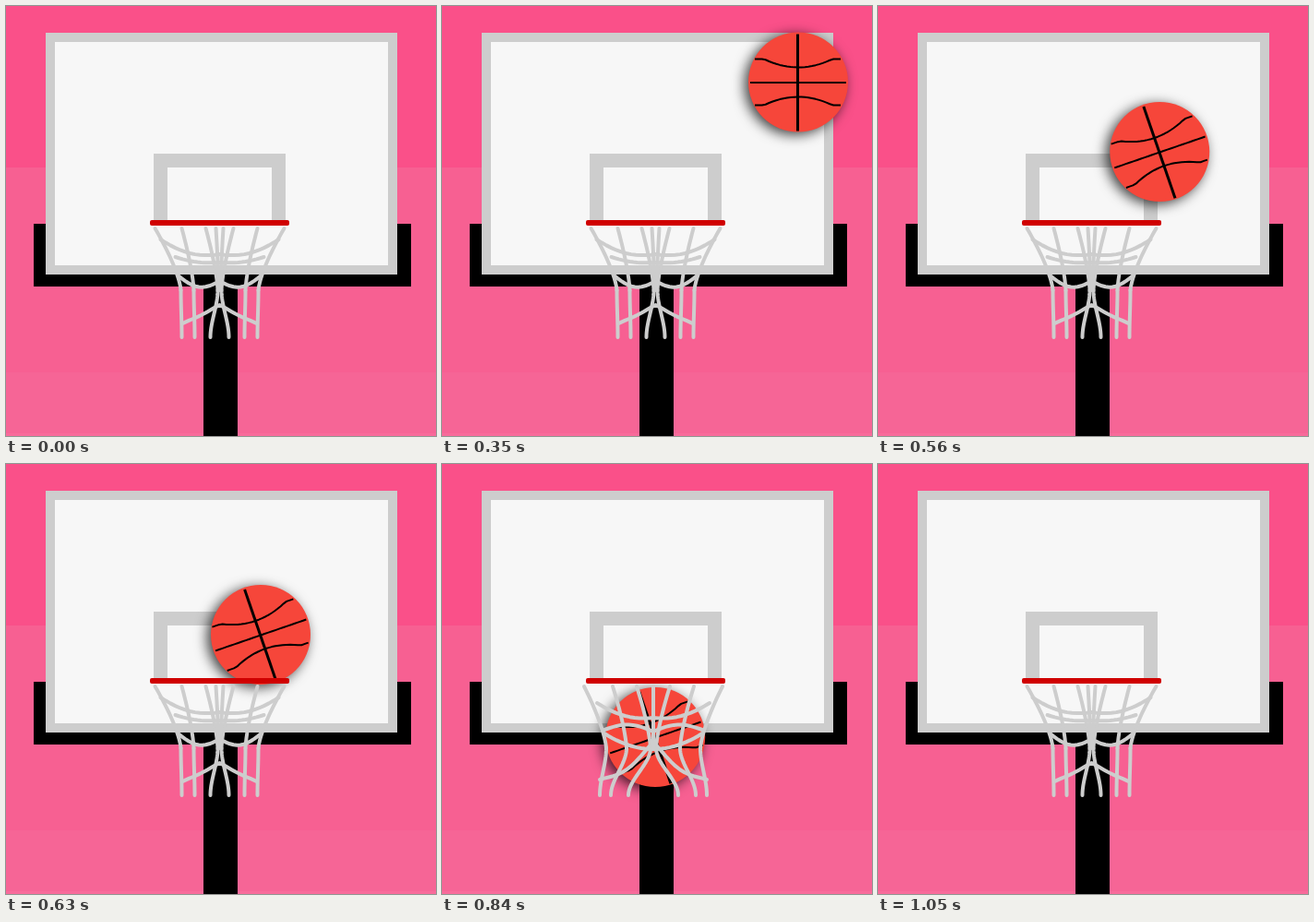
Recreate the animation shown at these times as an HTML page with a canvas. Size 466 by 466 pixels, loop 2190 ms.

```html
<!DOCTYPE html>
<html lang="en">
<head>
<meta charset="utf-8">
<title>Basketball shot</title>
<style>
html, body { margin: 0; width: 100%; height: 100%; overflow: hidden; }
canvas { display: block; }
</style>
</head>
<body>
<canvas width="466" height="466"></canvas>
<script>
const ctx = document.querySelector('canvas').getContext('2d');
const LOOP = 2190, TICK = 70, FIRST_TICK = 3;
const GREY = '#cdcdcd', WHITE = '#f7f7f7';
const RIM_Y = 241, WAIST_Y = 308, END_Y = 359;

// Ball key points: step, x, y
const keys = [
  [0, 478, 32.5], [1, 478, 32.5], [2, 386, 82.5], [4, 334.5, 131],
  [6, 276, 185], [8, 231, 247], [11, 231.5, 394]
];

// strands: offset from the axis at rim, waist and end
// rings: half width, y at the side, y at the centre, extra sag between
const restNet = {
  axis: 231.5,
  strands: [[70, 42, 41], [41, 28, 27], [15, 2, 10], [4, 1]],
  rings: [[64, 253, 269, 3], [48, 272, 278, 1], [45, 292, 298, 8], [40, 344, 324, 6]]
};
const openNet = {
  axis: 229,
  strands: [[75, 51, 58], [44, 29, 46], [18, 3, 27], [0, 0]],
  rings: [[61, 259, 275, 2], [53, 288, 290, -7], [53, 292, 309, 0], [58, 342, 301, 20]]
};

const lerp = (a, b, t) => a + (b - a) * t;
const smooth = t => t * t * (3 - 2 * t);

function rect(color, x, y, w, h) {
  ctx.fillStyle = color;
  ctx.fillRect(x, y, w, h);
}

// Strokes the points at(t) for t from a to b
function trace(at, width, a = 0, b = 1) {
  ctx.lineWidth = width;
  ctx.beginPath();
  for (let i = 0; i <= 24; i++) ctx.lineTo(...at(lerp(a, b, i / 24)));
  ctx.stroke();
}

function drawCourt() {
  rect('#fa5089', 0, 0, 466, 175);
  rect('#f76092', 0, 175, 466, 222);
  rect('#f66596', 0, 397, 466, 66);
  rect('#f86b9b', 0, 463, 466, 3);
  rect('#000', 30, 236, 409, 68);
  rect('#000', 214, 300, 37, 166);
  rect(GREY, 43, 29, 381, 262);
  rect(WHITE, 53, 39, 361, 242);
  rect(GREY, 160, 160, 143, 75);
  rect(WHITE, 175, 175, 113, 60);
}

function drawBall(step) {
  const next = Math.max(1, keys.findIndex(k => k[0] >= step));
  const [s0, x0, y0] = keys[next - 1], [s1, x1, y1] = keys[next];
  const t = (step - s0) / (s1 - s0);
  const tilt = -9.5 * Math.min(2, Math.max(0, step - 2));

  ctx.save();
  ctx.translate(lerp(x0, x1, t), lerp(y0, y1, t));
  ctx.save();
  ctx.shadowColor = 'rgba(0,0,0,.75)';
  ctx.shadowBlur = 14;
  ctx.shadowOffsetX = -4;
  ctx.shadowOffsetY = 3;
  ctx.fillStyle = '#f6463a';
  ctx.beginPath();
  ctx.arc(0, 0, 54, 0, 2 * Math.PI);
  ctx.fill();
  ctx.restore();

  ctx.rotate(tilt * Math.PI / 180);
  ctx.strokeStyle = '#000';
  ctx.lineCap = 'butt';
  trace(y => [-.5, y], 3, -52, 53);
  trace(x => [x, .5], 2, -52, 52);
  for (const side of [-1, 1])
    trace(x => [x, side * (16 + 9 * Math.min(1, (x / 37) ** 2))], 2, -47, 46);
  ctx.restore();
}

function drawNet({ axis, strands, rings }) {
  ctx.strokeStyle = GREY;
  ctx.lineCap = ctx.lineJoin = 'round';
  for (const side of [-1, 1])
    for (const [top, waist, end] of strands) {
      trace(t => [axis + side * lerp(waist, top, (1 - t) ** 1.4), lerp(RIM_Y, WAIST_Y, t)], 4);
      if (end)
        trace(t => [axis + side * lerp(waist, end, smooth(t)), lerp(WAIST_Y, END_Y, t)], 4);
    }
  for (const [half, edge, centre, sag] of rings)
    trace(u => [axis + half * u,
      lerp(centre, edge, u * u) + sag * Math.sin(Math.PI * Math.abs(u))], 4, -1, 1);
}

function draw(time) {
  const step = Math.floor(time % LOOP / TICK) - FIRST_TICK;
  drawCourt();
  if (step >= 0 && step <= 11) drawBall(step);
  drawNet(step >= 8 && step <= 10 ? openNet : restNet);
  ctx.fillStyle = '#d00000';
  ctx.beginPath();
  ctx.roundRect(156, 232, 151, 6, 2);
  ctx.fill();
}

const start = performance.now();
function frame() {
  draw(performance.now() - start);
  requestAnimationFrame(frame);
}
frame();
</script>
</body>
</html>
```
